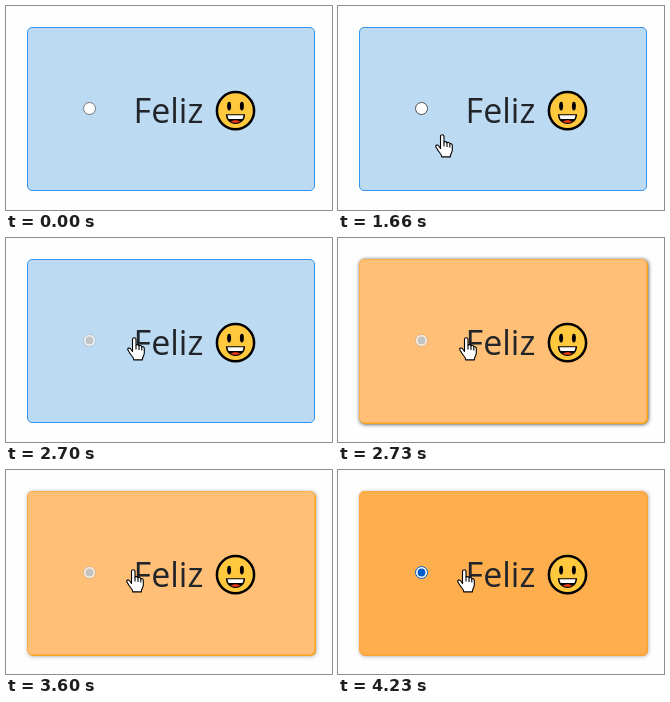
Animation of 326x204 px, one loop 5100 ms. Source, as an HTML page:

```html
<!DOCTYPE html>
<html lang="es">
<head>
<meta charset="utf-8">
<title>Feliz</title>
<style>
  html, body { margin: 0; width: 100%; height: 100%; overflow: hidden; background: #fefefe; }
  #card {
    position: absolute; left: 21px; top: 21px; width: 288px; height: 164px;
    box-sizing: border-box; border: 1px solid; border-radius: 5px;
  }
  svg { position: absolute; left: 0; top: 0; display: block; }
  text { font: 400 34px "Open Sans", "Noto Sans", sans-serif; fill: #212529; }
  .cursor { fill: #fff; stroke: #000; stroke-linejoin: round; }
</style>
</head>
<body>
<div id="card"></div>
<svg width="326" height="204" viewBox="0 0 326 204">
  <g transform="translate(83.5 102.5)">
    <circle id="ring" r="6"/>
    <circle id="dot" r="3.9"/>
  </g>
  <text x="127.6" y="117">Feliz</text>
  <g transform="translate(229.5 104.7)">
    <circle r="18.6" fill="#ffc83d" stroke="#000" stroke-width="2.5"/>
    <ellipse cx="-6.4" cy="-4.6" rx="2" ry="4.4"/>
    <ellipse cx="6.4" cy="-4.6" rx="2" ry="4.4"/>
    <path d="M-9.6 3.6H9.6C9.6 9.5 5.5 13.2 0 13.2S-9.6 9.5-9.6 3.6Z"/>
    <path d="M-8 4.6H8C7.8 6.3 7.4 7.3 6.8 8.3H-6.8C-7.4 7.3-7.8 6.3-8 4.6Z" fill="#fff"/>
    <path d="M-4.8 11C-3 8.9 3 8.9 4.8 11C2.4 12.5-2.4 12.5-4.8 11Z" fill="#f03a17"/>
  </g>
  <path id="arrow" class="cursor" d="M.5.7V16.6L4.2 13.1L6.8 18.6L9 17.6L6.5 12.3H11.6Z"/>
  <g id="hand" class="cursor" stroke-width="1.1">
    <path d="M5.5 14.5V2.6C5.5.1 9 .1 9 2.6V8.5C9.3 7.2 12 7.3 12 9.2C12.4 8 14.8 8.2 14.8 10C15.4 9.2 17.3 9.4 17.3 11.4V16C17.3 18.5 15.3 19.5 15.3 22.9H6.8C6.8 20 4 18.5 2.6 15.8L.8 12.8C.2 11 2.6 10.4 3.6 11.8Z"/>
    <path fill="none" d="M9 8.5V12.5M12 9.2V13M14.8 10V13.5"/>
  </g>
</svg>
<script>
const LOOP = 5100, STEP = 100 / 3;
const ENTER = 1430, OVER = 1597, REST = 1930;
const PRESS = 2660, DISABLE = 2700, WARM = 2730, DONE = 3630;

const $ = id => document.getElementById(id);
const [card, ring, dot, arrow, hand] = ["card", "ring", "dot", "arrow", "hand"].map($);

// Each table lists [start, value]; the last started entry applies.
const at = (table, t) => table.filter(row => row[0] <= t).pop()[1];

const cardLook = [
  [0, ["#bddaf3", "#3495ed"]],
  [WARM, ["#ffbf77", "#ffb04e"]],
  [DONE, ["#ffae4e", "#ffa63c"]],
];

// Ring fill, ring stroke, dot fill
const radioLook = [
  [0, ["#fff", "#767676", "none"]],
  [OVER, ["#fff", "#4f4f4f", "none"]],
  [PRESS, ["#fff", "#8d8d8d", "none"]],
  [DISABLE, ["rgba(255,255,255,.7)", "rgba(118,118,118,.3)", "#c3c3c3"]],
  [DONE, ["#fff", "#0075ff", "#0075ff"]],
  [4230, ["#fff", "#005cc8", "#005cc8"]],
];

const restX = [[0, 121], [3200, 120], [3860, 119]];

const clamp = v => Math.min(1, Math.max(0, v));

function place(node, shown, x, y) {
  node.style.display = shown ? "" : "none";
  node.setAttribute("transform", `translate(${Math.round(x)} ${Math.round(y)})`);
}

function drawCard(t) {
  const [fill, edge] = at(cardLook, t);
  card.style.backgroundColor = fill;
  card.style.borderColor = edge;
  const alpha = 0.85 - 0.45 * clamp((t - WARM) / (DONE - WARM));
  const rim = t < DONE ? "#f8a51c" : "#f5a437";
  card.style.boxShadow = t < WARM ? "none"
    : `1px 1px 0 ${rim}, 1px 1px 4px rgba(0,0,0,${alpha})`;
}

function drawRadio(t) {
  const [fill, stroke, mark] = at(radioLook, t);
  ring.setAttribute("fill", fill);
  ring.setAttribute("stroke", stroke);
  dot.setAttribute("fill", mark);
}

function drawCursor(t) {
  const stepped = Math.floor((t - ENTER + 1) / STEP) * STEP;
  const p = t >= REST ? 1 : clamp(stepped / (REST - ENTER));
  const ease = 1 - (1 - p) ** 2;
  const x = 60 + 67 * ease, y = 179 - 81 * ease;
  place(arrow, t >= ENTER && t < OVER, x, y);
  place(hand, t >= OVER, t < REST ? x - 6 : at(restX, t), y + 1);
}

function draw(t) {
  drawCard(t);
  drawRadio(t);
  drawCursor(t);
}

const start = performance.now();
function tick() {
  draw((performance.now() - start) % LOOP);
  requestAnimationFrame(tick);
}
tick();
</script>
</body>
</html>
```
